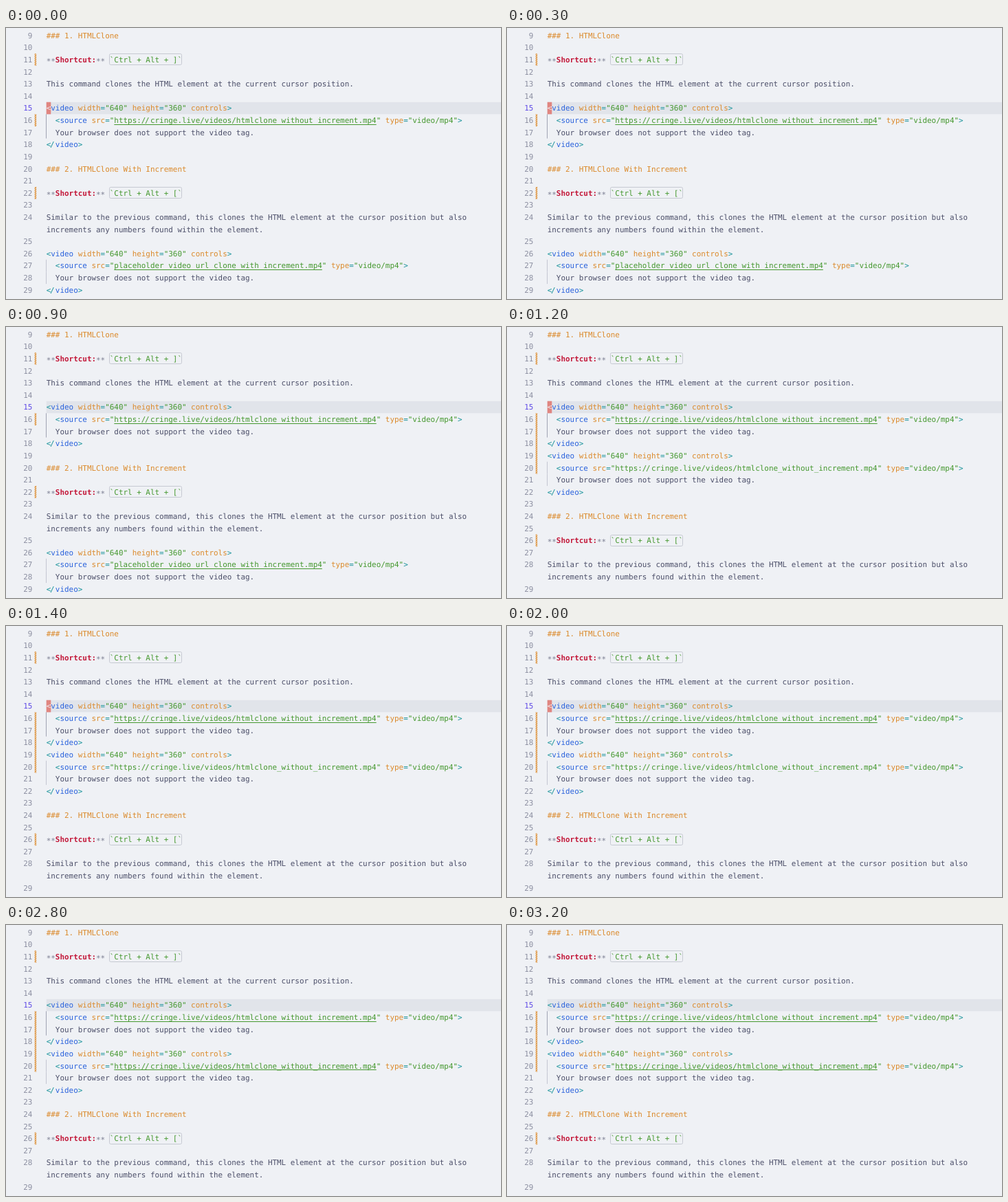
Recreate the animation shown at these times as an HTML page with a canvas. Size 720 by 394 pixels, loop 3.3 s.

```html
<!DOCTYPE html>
<html lang="en">
<head>
<meta charset="utf-8">
<title>HTMLClone</title>
<style>
html, body { margin: 0; width: 100%; height: 100%; overflow: hidden; background: #eff1f5; }
canvas { display: block; width: 720px; height: 394px; }
</style>
</head>
<body>
<canvas id="stage"></canvas>
<script>
const W = 720, H = 394, LOOP = 3300;
const LEFT = 58.7, CELL = 6.575, TOP = 2, ROW = 17.62, BASE = 12.7;
const FONT = '10.92px "DejaVu Sans Mono", "Noto Sans Mono", monospace';
const CURSOR_LINE = 15;

// Moments in the loop, in ms
const HIDE_1 = 600, CLONE = 1100, LINKED = 2200, HIDE_2 = 2800;

const C = {
  bg: '#eff1f5', text: '#4c4f69', head: '#db8a2c', bold: '#c3193a', mark: '#7c7f93',
  code: '#45982f', tag: '#2a62dc', punct: '#179299', attr: '#db8a2c', str: '#45982f',
  link: '#45982f', num: '#8c8fa1', active: '#5f4be6', current: '#e1e4ea',
  guide: '#c3c6d1', guideOn: '#a0a3b3', box: '#c6c9d2', cursor: '#e08580'
};

const canvas = document.getElementById('stage');
const ctx = canvas.getContext('2d');
const dpr = window.devicePixelRatio || 1;
canvas.width = W * dpr;
canvas.height = H * dpr;
ctx.scale(dpr, dpr);

// A line is a list of [style, text] runs plus optional flags
const line = (runs = [], flags = {}) => ({ runs, ...flags });
const plain = (text, flags) => line([['text', text]], flags);
const blank = () => line();
const heading = text => line([['head', '### ' + text]]);
const attr = (name, value, style = 'str') =>
  [['attr', ' ' + name], ['punct', '='], ['str', '"'], [style, value], ['str', '"']];
const shortcut = key => line([
  ['mark', '**'], ['bold', 'Shortcut:'], ['mark', '**'], ['text', ' '],
  ['code', '`Ctrl + Alt + ' + key + '`']
], { changed: true });

const video = (url, linked, changed, guide) => [
  line([['punct', '<'], ['tag', 'video'], ...attr('width', '640'), ...attr('height', '360'),
    ['attr', ' controls'], ['punct', '>']], { changed: changed[0] }),
  line([['punct', '  <'], ['tag', 'source'], ...attr('src', url, linked ? 'link' : 'str'),
    ...attr('type', 'video/mp4'), ['punct', '>']], { changed: changed[1], guide }),
  plain('  Your browser does not support the video tag.', { changed: changed[2], guide }),
  line([['punct', '</'], ['tag', 'video'], ['punct', '>']], { changed: changed[3] })
];

const CLIP = 'https://cringe.live/videos/htmlclone_without_increment.mp4';
const NEXT = 'placeholder_video_url_clone_with_increment.mp4';

function buildDoc(cloned, linked) {
  return [
    heading('1. HTMLClone'), blank(),
    shortcut(']'), blank(),
    plain('This command clones the HTML element at the current cursor position.'), blank(),
    ...video(CLIP, true, [0, 1, cloned, cloned], 'guideOn'),
    ...(cloned ? video(CLIP, linked, [1, 1, 0, 0], 'guide') : []),
    blank(),
    heading('2. HTMLClone With Increment'), blank(),
    shortcut('['), blank(),
    plain('Similar to the previous command, this clones the HTML element at the cursor position but also'),
    plain('increments any numbers found within the element.', { wrapped: true }), blank(),
    ...video(NEXT, true, [0, 0, 0, 0], 'guide')
  ].slice(0, 22);
}

const docs = [buildDoc(false, false), buildDoc(true, false), buildDoc(true, true)];

function rect(color, x, y, w, h) {
  ctx.fillStyle = color;
  ctx.fillRect(x, y, w, h);
}

// Draws text on the cell grid, tightening "//" and "</" like a code font
function drawText(text, x, y, color) {
  ctx.fillStyle = color;
  for (let i = 0; i < text.length; i++) {
    const ch = text[i];
    const tight = ch === '/' && (text[i - 1] === '/' || text[i - 1] === '<');
    ctx.fillText(ch, x + i * CELL - (tight ? 1.3 : 0), y + (ch === '*' ? 2 : 0));
  }
}

function drawChangeBar(y) {
  ctx.save();
  ctx.beginPath();
  ctx.rect(41.6, y, 2.6, ROW);
  ctx.clip();
  ctx.strokeStyle = C.attr;
  ctx.lineWidth = 1.5;
  ctx.beginPath();
  for (let s = Math.floor(y / 3) * 3 - 3; s < y + ROW + 3; s += 3) {
    ctx.moveTo(41, s + 3.2);
    ctx.lineTo(45, s - 0.8);
  }
  ctx.stroke();
  ctx.restore();
}

function drawCodeBox(x, y, w) {
  ctx.strokeStyle = C.box;
  ctx.lineWidth = 1;
  ctx.beginPath();
  ctx.roundRect(Math.round(x) - 0.5, Math.round(y) + 0.5, Math.round(w), 16, 2);
  ctx.stroke();
}

function drawRuns(runs, y) {
  let x = LEFT;
  for (const [style, text] of runs) {
    const w = text.length * CELL;
    if (style === 'code') drawCodeBox(x, y, w);
    if (style === 'link') rect(C.link, x, Math.round(y + 14.6), w, 1);
    ctx.font = (style === 'bold' ? 'bold ' : '') + FONT;
    drawText(text, x, y + BASE, C[style]);
    x += w;
  }
}

function draw(t) {
  const doc = docs[t < CLONE ? 0 : t < LINKED ? 1 : 2];
  const cursorOn = t < HIDE_1 || (t >= CLONE && t < HIDE_2);
  rect(C.bg, 0, 0, W, H);
  ctx.textRendering = 'geometricPrecision';
  ctx.textBaseline = 'alphabetic';

  let number = 8;
  doc.forEach((item, i) => {
    const y = TOP + i * ROW;
    if (!item.wrapped) number++;
    const current = number === CURSOR_LINE;
    if (current) rect(C.current, LEFT, y, W - LEFT, ROW);
    if (item.changed) drawChangeBar(y);
    if (item.guide) rect(C[item.guide], 58, y, 1, ROW);
    if (!item.wrapped) {
      const label = String(number);
      ctx.font = FONT;
      drawText(label, 38.3 - label.length * CELL, y + BASE, current ? C.active : C.num);
    }
    drawRuns(item.runs, y);
    if (current && cursorOn) {
      rect(C.cursor, LEFT, y, CELL, ROW);
      ctx.font = FONT;
      drawText('<', LEFT, y + BASE, C.bg);
    }
  });
}

const start = performance.now();
function tick() {
  draw((performance.now() - start) % LOOP);
  requestAnimationFrame(tick);
}
tick();
</script>
</body>
</html>
```
